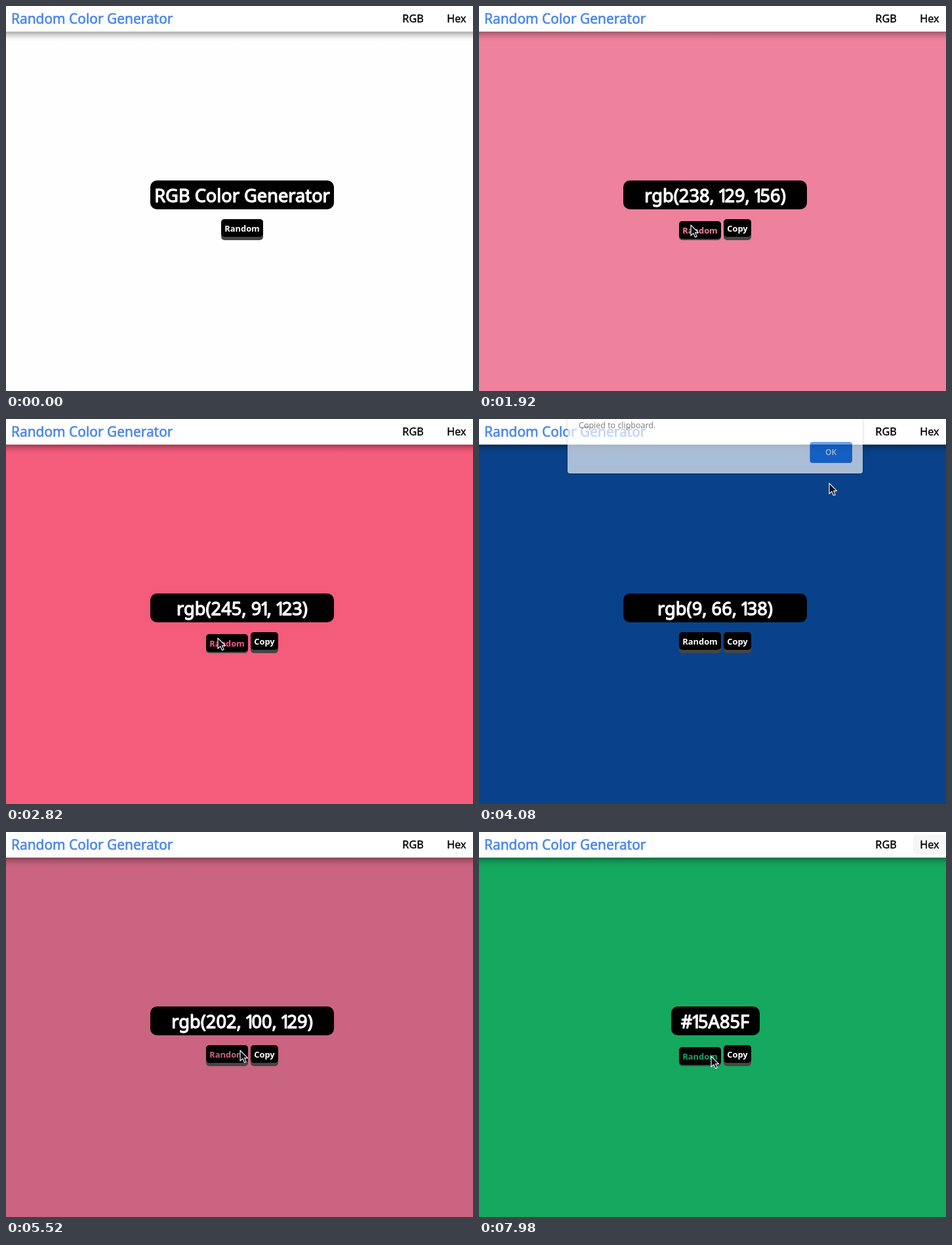
Animation of 712 by 587 pixels, one loop 8 s. Source, as an HTML page:

```html
<!DOCTYPE html>
<html lang="en">
<head>
<meta charset="utf-8">
<title>Random Color Generator</title>
<style>
  html, body { margin: 0; width: 100%; height: 100%; overflow: hidden; background: #fefefe; }
  svg { display: block; width: 712px; height: 587px; }
  text { font-family: "Noto Sans", sans-serif; stroke-linejoin: round; }
  .brand { font-size: 20.9px; fill: #4a86ee; stroke: #4a86ee; stroke-width: .6; }
  .nav { font-size: 16.2px; text-anchor: middle; stroke: #000; stroke-width: .35; }
  .label { font-size: 27.2px; fill: #fff; text-anchor: middle; stroke: #fff; stroke-width: 1.3; }
  .btn text { font-size: 12.9px; font-weight: 700; text-anchor: middle; }
  #alert text { font-family: "Open Sans", sans-serif; }
</style>
</head>
<body>
<svg viewBox="0 0 712 587" xmlns="http://www.w3.org/2000/svg">
  <defs>
    <linearGradient id="fade" x2="0" y2="1">
      <stop offset="0" stop-opacity=".31"/>
      <stop offset=".2" stop-opacity=".24"/>
      <stop offset=".4" stop-opacity=".14"/>
      <stop offset=".6" stop-opacity=".065"/>
      <stop offset=".8" stop-opacity=".02"/>
      <stop offset="1" stop-opacity="0"/>
    </linearGradient>
    <filter id="soft" x="-5%" y="-10%" width="110%" height="125%">
      <feDropShadow dx="0" dy="1" stdDeviation="2" flood-opacity=".3"/>
    </filter>
  </defs>

  <rect id="page" width="712" height="587"/>
  <rect y="39" width="712" height="15" fill="url(#fade)"/>
  <rect width="712" height="39" fill="#fff"/>
  <text class="brand" x="8" y="26.7">Random Color Generator</text>
  <rect id="navHover" x="662" y="4" width="54" height="30" rx="5" fill="#f6f6f6"/>
  <text class="nav" x="620.5" y="25">RGB</text>
  <text class="nav" x="687" y="25">Hex</text>

  <rect id="box" y="266" height="44" rx="10"/>
  <text id="label" class="label" x="360" y="298.7"></text>

  <g id="random" class="btn"></g>
  <g id="copy" class="btn"></g>

  <g id="alert">
    <path d="M135 -10H585V125a4 4 0 0 1 -4 4H139a4 4 0 0 1 -4 -4Z" fill="#fff" filter="url(#soft)"/>
    <text x="152" y="28" font-size="14.5" fill="#202124">This page says</text>
    <text x="152" y="59.7" font-size="12.5" fill="#333">Copied to clipboard.</text>
    <rect x="504.5" y="81" width="64.5" height="32" rx="4" fill="#1a6fe0"/>
    <text x="536.5" y="101" font-size="12" font-weight="600" fill="#fff" text-anchor="middle">OK</text>
  </g>

  <path id="cursor" d="M0 0V16L3.8 12.6L6.5 18.6L9.2 17.4L6.6 11.6H11.6Z" fill="#0b0b18" stroke="#fff" stroke-width="1.1" stroke-linejoin="round"/>
</svg>
<script>
const LOOP = 8000, FADE = 550, HEX_AT = 6660;
const $ = id => document.getElementById(id);
const clamp = v => Math.max(0, Math.min(1, v));

// button press times: [down, up]
const presses = [[300, 360], [1020, 1140], [1860, 1980], [2700, 2940], [3240, 3330],
  [4440, 4500], [4860, 4920], [7260, 7440], [7960, 8000]];

// background colours and when each begins
const WHITE = [254, 254, 254];
const colors = [
  [360, [172, 204, 131]], [1140, [238, 129, 156]], [1980, [245, 91, 123]],
  [2940, [9, 66, 138]], [4500, [84, 171, 148]], [4920, [202, 100, 129]],
  [HEX_AT, WHITE], [7440, [21, 168, 95]]
];

// pointer moves: start, end, x, y, bend
const START = [352, 400];
const moves = [
  [180, 300, 323, 334, 0], [2960, 3220, 389, 336, 0], [3430, 3800, 534, 98, 0],
  [4110, 4400, 357, 333, 0], [5580, 6150, 683, 18, .08], [6720, 7150, 354, 342, 0]
];

function pointer(t) {
  let [x, y] = START;
  for (const [a, b, tx, ty, bend] of moves) {
    if (t < a) break;
    const e = 1 - (1 - clamp((t - a) / (b - a))) ** 2;
    x += (tx - x) * e;
    y += (ty - y) * (e - bend * Math.sin(Math.PI * e));
  }
  return { x, y };
}

// CSS "ease" curve, solved by bisection
function ease(u) {
  let lo = 0, hi = 1, s = u;
  for (let i = 0; i < 16; i++) {
    s = (lo + hi) / 2;
    const x = .75 * s * (1 - s) ** 2 + .75 * s * s * (1 - s) + s ** 3;
    if (x < u) lo = s; else hi = s;
  }
  return .3 * s * (1 - s) ** 2 + 3 * s * s * (1 - s) + s ** 3;
}

function background(t) {
  let from = WHITE, picked = null;
  for (const [at, to] of colors) {
    if (t < at) break;
    const e = at === HEX_AT ? 1 : ease(clamp((t - at) / FADE));
    from = from.map((v, i) => v + (to[i] - v) * e);
    picked = to === WHITE ? null : to;
  }
  return { css: `rgb(${from.map(Math.round)})`, picked };
}

// the digit 1 is set tighter than the others
function setLabel(str) {
  const el = $('label');
  if (el.textContent === str) return;
  el.textContent = str;
  const kern = (c, i) => (c === '1' ? -2 : 0) + (str[i - 1] === '1' ? -5 : 0);
  el.setAttribute('dx', [...str].map(kern).join(' '));
}

function makeButton(id, name, w) {
  $(id).innerHTML = `<rect y="325" width="${w}" height="32" rx="5" fill="#464646"/>
    <g><rect y="325" width="${w}" height="27" rx="5"/><text x="${w / 2}" y="344">${name}</text></g>`;
  const [base, face] = $(id).children, text = face.lastChild;
  return (x, p, down, hoverFill) => {
    const over = p.x >= x && p.x < x + w && p.y >= 325 && p.y < 357;
    const drop = over && down ? 3 : 0;
    $(id).setAttribute('transform', `translate(${x} 0)`);
    base.setAttribute('y', 325 + drop);
    base.setAttribute('height', 32 - drop);
    face.setAttribute('transform', `translate(0 ${drop})`);
    text.setAttribute('fill', over ? hoverFill : '#fff');
  };
}
const drawRandom = makeButton('random', 'Random', 64);
const drawCopy = makeButton('copy', 'Copy', 42);

function draw(t) {
  const p = pointer(t), hex = t >= HEX_AT;
  const { css, picked } = background(t);
  const down = presses.some(([a, b]) => t >= a && t < b);
  $('page').setAttribute('fill', css);

  let text = hex ? 'HEX Color Generator' : 'RGB Color Generator', w = hex ? 278 : 280;
  if (picked && hex) {
    text = '#' + picked.map(v => v.toString(16).padStart(2, '0')).join('').toUpperCase();
    w = 135;
  } else if (picked) {
    text = `rgb(${picked.join(', ')})`;
  }
  setLabel(text);
  $('box').setAttribute('x', 360 - Math.floor(w / 2));
  $('box').setAttribute('width', w);

  drawRandom(picked ? 305 : 328, p, down, picked ? css : '#000');
  drawCopy(373, p, down, css);
  $('copy').style.display = picked ? '' : 'none';

  const onHex = p.x >= 662 && p.y >= 4 && p.y < 34;
  $('navHover').style.display = hex || onHex ? '' : 'none';

  const shown = t < 4000 ? clamp((t - 3360) / 120) : 1 - clamp((t - 4020) / 174);
  $('alert').style.display = shown ? '' : 'none';
  $('alert').setAttribute('opacity', shown);
  $('alert').setAttribute('transform', `translate(0 ${-131 * (1 - shown)})`);

  $('cursor').style.display = t < 180 ? 'none' : '';
  $('cursor').setAttribute('transform', `translate(${p.x} ${p.y})`);
}

const begin = performance.now();
function tick(now) {
  draw(Math.max(0, now - begin) % LOOP);
  requestAnimationFrame(tick);
}
draw(0);
requestAnimationFrame(tick);
</script>
</body>
</html>
```
